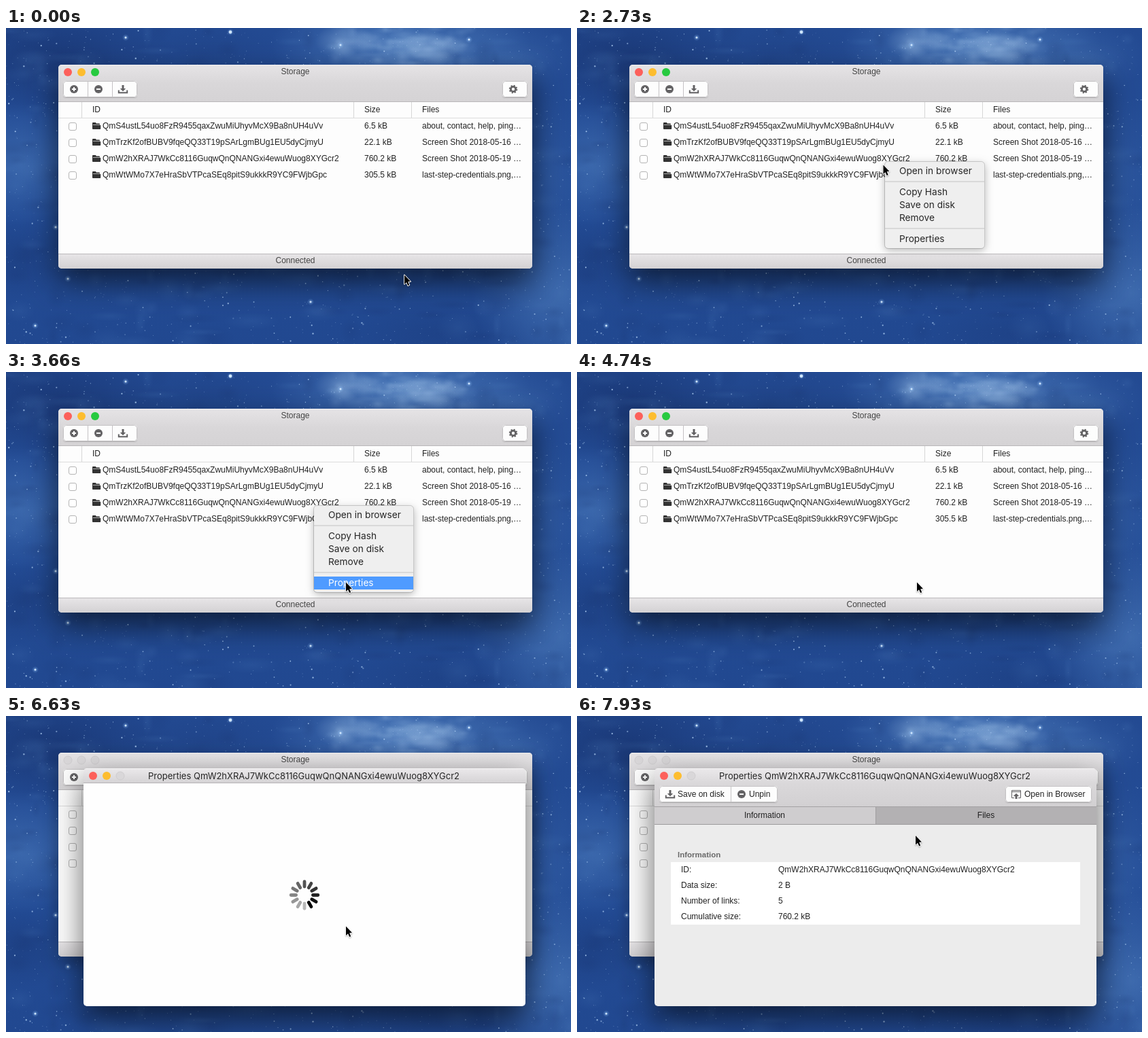
Recreate the animation shown at these times as an HTML page with a canvas. Size 831 px wide and 465 px high, loop 8000 ms.

```html
<!DOCTYPE html>
<html lang="en">
<head>
<meta charset="utf-8">
<title>Storage</title>
<style>
  html, body { margin: 0; width: 100%; height: 100%; overflow: hidden; background: #1f4288; }
  canvas { display: block; }
</style>
</head>
<body>
<canvas id="stage" width="831" height="465"></canvas>
<script>
const W = 831, H = 465, LOOP = 8000;
const stage = document.getElementById('stage').getContext('2d');
let g = stage;

const SANS = '12px "Liberation Sans", Arial, sans-serif';
const BOLD = 'bold 11.5px "Liberation Sans", Arial, sans-serif';
const MENU = '13.7px Inter, sans-serif';
const TITLE = '13px Inter, sans-serif';
const HASH = 'QmW2hXRAJ7WkCc8116GuqwQnQNANGxi4ewuWuog8XYGcr2';
const ICON = '#636264';

const ROWS = [
  ['QmS4ustL54uo8FzR9455qaxZwuMiUhyvMcX9Ba8nUH4uVv', '6.5 kB', 'about, contact, help, ping…'],
  ['QmTrzKf2ofBUBV9fqeQQ33T19pSArLgmBUg1EU5dyCjmyU', '22.1 kB', 'Screen Shot 2018-05-16 …'],
  [HASH, '760.2 kB', 'Screen Shot 2018-05-19 …'],
  ['QmWtWMo7X7eHraSbVTPcaSEq8pitS9ukkkR9YC9FWjbGpc', '305.5 kB', 'last-step-credentials.png,…']
];
const MENU_ITEMS = [['Open in browser', 210], ['Copy Hash', 241], ['Save on disk', 260],
  ['Remove', 279], ['Properties', 310]];
const INFO = [['ID:', HASH], ['Data size:', '2 B'], ['Number of links:', '5'], ['Cumulative size:', '760.2 kB']];

// Pointer moves: start, end, number of steps, destination, sideways bend
const START = [586, 363.5];
const MOVES = [
  [120, 470, 4, 581, 346, 0],
  [1300, 1770, 5, 450.5, 201.5, 0],
  [2970, 3660, 7, 500, 309.5, 0],
  [7230, 7930, 7, 498, 176, -6]
];

// ---- drawing helpers ----
function rect(x, y, w, h, fill) {
  g.fillStyle = fill;
  g.fillRect(x, y, w, h);
}
function box(x, y, w, h, radius, fill, stroke) {
  g.beginPath();
  g.roundRect(x, y, w, h, radius);
  if (fill) { g.fillStyle = fill; g.fill(); }
  if (stroke) { g.strokeStyle = stroke; g.lineWidth = 1; g.stroke(); }
}
function disc(x, y, r, fill, stroke) {
  box(x - r, y - r, 2 * r, 2 * r, r, fill, stroke);
}
function line(points, color, width) {
  g.beginPath();
  points.forEach(([x, y]) => g.lineTo(x, y));
  g.strokeStyle = color;
  g.lineWidth = width;
  g.stroke();
}
function text(str, x, y, color = '#222', font = SANS, align = 'left') {
  g.font = font;
  g.fillStyle = color;
  g.textAlign = align;
  g.fillText(str, x, y);
}
function vertical(y0, y1, ...colors) {
  const grad = g.createLinearGradient(0, y0, 0, y1);
  colors.forEach((c, i) => grad.addColorStop(i / (colors.length - 1), c));
  return grad;
}
function shadowed(alpha, blur, dy, draw) {
  g.save();
  g.shadowColor = `rgba(0,0,0,${alpha})`;
  g.shadowBlur = blur;
  g.shadowOffsetY = dy;
  draw();
  g.restore();
}
function at(x, y, draw) {
  g.save();
  g.translate(x, y);
  draw();
  g.restore();
}

// ---- night sky, painted once ----
function paintSky() {
  const layer = document.createElement('canvas');
  layer.width = W;
  layer.height = H;
  g = layer.getContext('2d');
  let seed = 11;
  const rnd = () => (seed = seed * 16807 % 2147483647) / 2147483647;
  const spread = () => rnd() + rnd() - 1;
  const glow = (x, y, rx, ry, rgb, alpha) => at(x, y, () => {
    g.scale(rx, ry);
    const grad = g.createRadialGradient(0, 0, 0, 0, 0, 1);
    grad.addColorStop(0, `rgba(${rgb},${alpha})`);
    grad.addColorStop(1, `rgba(${rgb},0)`);
    rect(-1, -1, 2, 2, grad);
  });
  rect(0, 0, W, H, vertical(0, H, '#234a92', '#234c96', '#214890'));
  const dark = '20,44,100', light = '80,128,192', pale = '150,185,225';
  glow(70, 45, 180, 90, dark, .6);
  glow(290, 40, 130, 50, dark, .2);
  glow(20, 200, 110, 90, light, .5);
  glow(20, 340, 100, 60, dark, .3);
  glow(580, 25, 190, 85, light, .8);
  glow(730, 40, 110, 60, light, .3);
  glow(815, 390, 130, 130, light, .6);
  glow(800, 220, 70, 120, light, .2);
  glow(640, 450, 130, 50, dark, .2);
  for (let i = 0; i < 300; i++) {
    glow(rnd() * W, rnd() * H, 6 + rnd() * 35, 5 + rnd() * 18, rnd() < .45 ? dark : light, .14);
  }
  for (let i = 0; i < 90; i++) {
    glow(585 + 120 * spread(), 25 + 35 * spread(), 6 + rnd() * 22, 4 + rnd() * 12, pale, .16);
  }
  glow(622, 32, 45, 28, pale, .45);
  glow(490, 20, 35, 25, pale, .35);
  for (let i = 0; i < 1700; i++) {
    const size = .45 + rnd() ** 6 * .8;
    disc(rnd() * W, rnd() * H, size, `rgba(180,212,248,${.25 + rnd() * .6})`);
  }
  [[330, 6], [492, 25], [73, 293], [91, 369], [43, 438], [448, 403], [176, 14], [681, 17]].forEach(([x, y], i) => {
    glow(x, y, 5, 5, '150,200,255', .5);
    disc(x, y, i ? 1.5 : 2.4, '#cfe6ff');
  });
  g = stage;
  return layer;
}

// ---- icons ----
function signIcon(x, y, plus) {
  disc(x, y, 6, ICON);
  rect(x - 3, y - 1, 6, 2, '#fff');
  if (plus) rect(x - 1, y - 3, 2, 6, '#fff');
}
function arrowIcon(dir) {
  rect(-1.5, dir > 0 ? -6 : -1, 3, 6, ICON);
  g.beginPath();
  g.moveTo(-4.2, -dir);
  g.lineTo(4.2, -dir);
  g.lineTo(0, 3.2 * dir);
  g.fill();
}
function saveIcon(x, y) {
  at(x, y, () => {
    arrowIcon(1);
    line([[-6.2, 1.5], [-6.2, 5.2], [6.2, 5.2], [6.2, 1.5]], ICON, 2);
  });
}
function gearIcon(x, y) {
  at(x, y, () => {
    g.strokeStyle = ICON;
    g.lineWidth = 2.8;
    g.beginPath();
    g.arc(0, 0, 3.6, 0, 7);
    g.stroke();
    g.lineWidth = 2;
    g.setLineDash([Math.PI * 5.3 / 8]);
    g.beginPath();
    g.arc(0, 0, 5.3, 0, 2 * Math.PI);
    g.stroke();
  });
}
function browserIcon(x, y) {
  at(x, y, () => {
    line([[-3, 5.5], [-6.5, 5.5], [-6.5, -5.5], [6.5, -5.5], [6.5, 5.5], [3, 5.5]], ICON, 1);
    line([[-6.5, -3.5], [6.5, -3.5]], ICON, 1);
    g.translate(0, 2);
    arrowIcon(-1);
  });
}
function folderIcon(x, y) {
  box(x, y, 5.5, 4, 1, '#333');
  box(x, y + 1.5, 11, 8.5, 1, '#333');
  rect(x + 1, y + 3, 11, .8, '#fff');
  box(x + .8, y + 3.8, 11.4, 6.2, 1, '#333');
}
function button(x, w, y, h) {
  shadowed(.18, 1, 1, () => box(x, y, w, h, 4, '#fdfdfd'));
  box(x + .5, y + .5, w - 1, h - 1, 4, null, '#c4c2c4');
}
function lights(x, y, colors) {
  colors.forEach((c, i) => disc(x + 20 * i, y, 6, c || '#d9d7d9', c ? null : '#cfcdcf'));
}

// ---- windows ----
function storageWindow(active) {
  shadowed(active ? .6 : .35, active ? 44 : 26, active ? 19 : 9, () => box(77, 54, 697, 300, 5, '#fdfdfd'));
  box(77, 54, 697, 54, [5, 5, 0, 0], vertical(54, 108, '#e6e4e6', '#d9d7d9', '#d5d3d5'));
  rect(81, 54, 689, 1, '#f0eff0');
  rect(77, 108, 697, 1, '#b9b7b9');
  lights(91, 65, active ? ['#fc605b', '#fdbd2f', '#27ca40'] : [0, 0, 0]);
  text('Storage', 425.5, 68, '#444', SANS, 'center');

  button(84, 109, 78, 24);
  rect(120, 79, 1, 22, '#c4c2c4');
  rect(156, 79, 1, 22, '#c4c2c4');
  signIcon(100, 90, true);
  signIcon(136, 90, false);
  saveIcon(172, 90);
  button(730, 37, 78, 24);
  gearIcon(746, 90);

  rect(77, 132, 697, 1, '#dcdcdc');
  [111, 511, 596].forEach(x => rect(x, 109, 1, 23, '#d6d6d6'));
  text('ID', 127, 124);
  text('Size', 527, 124);
  text('Files', 612, 124);
  ROWS.forEach(([id, size, files], i) => {
    const y = 148 + 24 * i;
    box(92.5, y - 8.5, 11, 11, 2.5, '#fff', '#b4b4b4');
    folderIcon(127, y - 9);
    text(id, 142, y);
    text(size, 527, y);
    text(files, 612, y);
  });

  box(77, 332, 697, 22, [0, 0, 5, 5], vertical(332, 354, '#e8e6e8', '#d3d1d3'));
  rect(77, 332, 697, 1, '#bbb9bb');
  text('Connected', 425.5, 346, '#444', SANS, 'center');
}

function contextMenu(alpha, x, y) {
  g.save();
  g.globalAlpha = alpha;
  shadowed(.28, 12, 3, () => box(453, 197, 147, 127, 5, '#efefef'));
  box(452.5, 196.5, 147, 128, 5, null, 'rgba(0,0,0,.16)');
  rect(453, 225, 146, 2, '#d9d9d9');
  rect(453, 294, 146, 2, '#d9d9d9');
  MENU_ITEMS.forEach(([label, mid]) => {
    const hot = x > 452 && Math.abs(y - mid) <= 9.5;
    if (hot) rect(453, mid - 9, 146, 19, '#4f9bff');
    text(label, 474, mid + 5, hot ? '#fff' : '#262626', MENU);
  });
  g.restore();
}

function spinner(lead) {
  at(439, 263.5, () => {
    g.lineCap = 'round';
    for (let i = 0; i < 12; i++) {
      const behind = (lead - i + 120) % 12;
      line([[0, -12.4], [0, -19.8]], `rgba(0,0,0,${1 - .066 * behind})`, 4.8);
      g.rotate(Math.PI / 6);
    }
  });
}

function information() {
  rect(114, 99, 650, 34, vertical(99, 133, '#dad8da', '#d2d0d2'));
  button(121, 174, 103, 24);
  rect(226, 104, 1, 22, '#c4c2c4');
  saveIcon(137, 115);
  text('Save on disk', 148, 119);
  signIcon(242, 115, false);
  text('Unpin', 253, 119);
  button(630, 127, 103, 24);
  browserIcon(646, 115);
  text('Open in Browser', 658, 119);

  rect(114, 133, 325, 26, '#cfcdcf');
  rect(439, 133, 325, 26, '#b3b1b3');
  rect(114, 133, 650, 1, '#a4a2a4');
  rect(114, 159, 650, 1, '#9c9a9c');
  rect(439, 133, 1, 26, '#a09ea0');
  text('Information', 276, 150, '#222', SANS, 'center');
  text('Files', 601.5, 150, '#222', SANS, 'center');

  text('Information', 148, 208, '#6a6a6a', BOLD);
  rect(138, 215, 602, 92, '#fff');
  INFO.forEach(([label, value], i) => {
    text(label, 153, 230 + 23 * i);
    text(value, 296, 230 + 23 * i);
  });
}

function propertiesWindow(t) {
  const loaded = t >= 6990;
  shadowed(.6, 44, 18, () => box(114, 77, 650, 350, 5, loaded ? '#ececec' : '#fefefe'));
  box(114, 77, 650, 22, [5, 5, 0, 0], vertical(77, 99, '#ebe9eb', loaded ? '#dad8da' : '#d4d2d4'));
  rect(118, 77, 642, 1, '#f5f4f5');
  lights(128, 88, ['#fc605b', '#fdbd2f', 0]);
  text('Properties ' + HASH, 438, 93, '#262626', TITLE, 'center');
  if (loaded) {
    information();
  } else {
    rect(114, 98, 650, 1, '#b5b3b5');
    const tick = Math.min(9, Math.floor((t - 5580) / 116.6));
    spinner(4 + Math.floor((tick * 116.7 + 40) / 83.33));
  }
}

// ---- pointer ----
function pointerAt(t) {
  let [x, y] = START;
  for (const [from, to, steps, toX, toY, bend] of MOVES) {
    if (t < from) break;
    const step = Math.floor((t - from) * (steps - 1) / (to - from) + 1e-6) + 1;
    const p = Math.min(1, step / steps);
    const e = p * p * (3 - 2 * p);
    x += (toX - x) * e + bend * Math.sin(Math.PI * e);
    y += (toY - y) * e;
  }
  return [x, y];
}
function pointer(x, y) {
  at(x, y, () => {
    g.lineJoin = 'round';
    shadowed(.3, 2, 1, () => {
      g.beginPath();
      [[0, 0], [0, 13.4], [3, 10.7], [5.2, 15.6], [7.2, 14.7], [5.2, 9.8], [9, 9.5]]
        .forEach(([px, py]) => g.lineTo(px, py));
      g.closePath();
      g.lineWidth = 1.8;
      g.strokeStyle = '#fff';
      g.stroke();
    });
    g.fillStyle = '#000';
    g.fill();
  });
}

const sky = paintSky();

function frame() {
  const t = performance.now() % LOOP;
  const [x, y] = pointerAt(t);
  g.drawImage(sky, 0, 0);
  storageWindow(t < 5580);
  if (t >= 2730 && t < 4740) contextMenu(t < 4620 ? 1 : .45, x, y);
  if (t >= 5580) propertiesWindow(t);
  pointer(x, y);
  requestAnimationFrame(frame);
}
frame();
</script>
</body>
</html>
```
